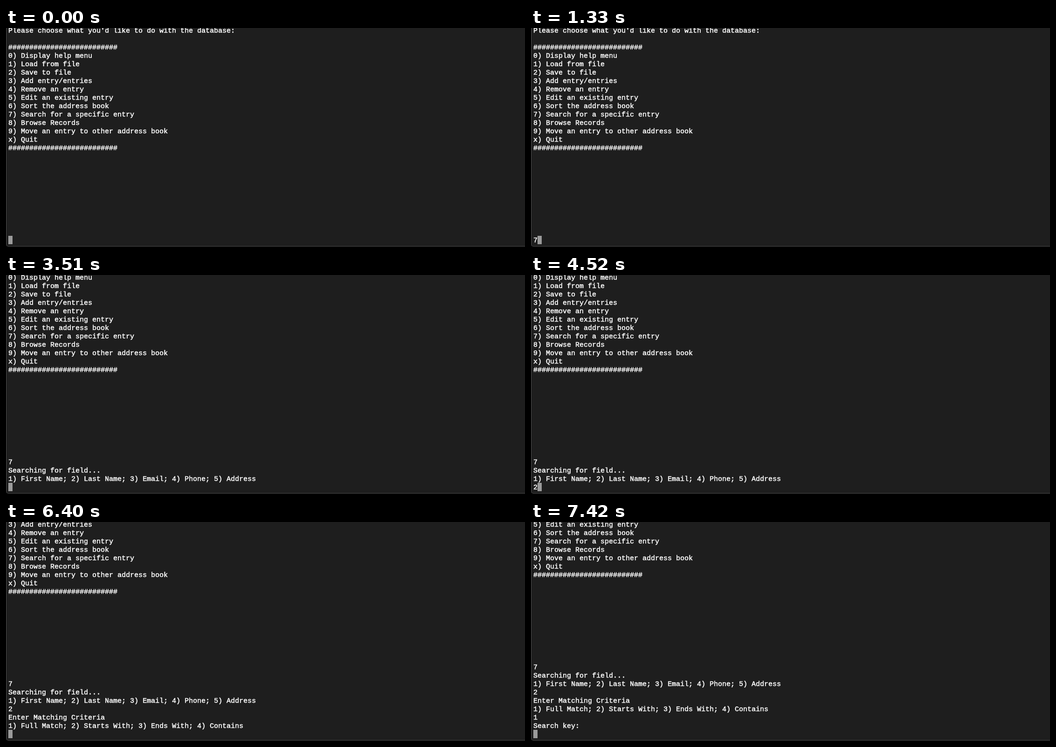
An HTML page that plays this animation: 1113x470 px, repeating every 8 s.

```html
<!DOCTYPE html>
<html lang="en">
<head>
<meta charset="utf-8">
<title>Address book terminal</title>
<style>
  html, body { margin: 0; width: 100%; height: 100%; overflow: hidden; background: #000; }
  #term {
    position: absolute; left: 0; top: -10px; width: 1113px; height: 479px; box-sizing: border-box;
    background: #1e1e1e; border: solid #4b4b4b; border-width: 0 0 1px 1px;
    border-bottom-left-radius: 5px;
  }
  #text {
    position: absolute; left: 5px; bottom: 4px; margin: 0; color: #fff;
    font: 15px/18px "Liberation Mono", "Courier New", monospace;
    -webkit-text-stroke: .5px #fff; font-variant-ligatures: none;
  }
  #cursor { position: absolute; top: 446px; width: 9px; height: 18px; background: #9b9b9b; }
</style>
</head>
<body>
<div id="term"></div>
<pre id="text"></pre>
<div id="cursor"></div>
<script>
const LOOP = 8000;
const rule = "#".repeat(26);
const menu = [
  "Please choose what you'd like to do with the database:",
  "",
  rule,
  "0) Display help menu",
  "1) Load from file",
  "2) Save to file",
  "3) Add entry/entries",
  "4) Remove an entry",
  "5) Edit an existing entry",
  "6) Sort the address book",
  "7) Search for a specific entry",
  "8) Browse Records",
  "9) Move an entry to other address book",
  "x) Quit",
  rule
].join("\n") + "\n".repeat(11);

// Terminal output and keystrokes, each appended at its time in ms
const events = [
  [0, menu],
  [320, "7"],
  [2000, "\nSearching for field...\n1) First Name; 2) Last Name; 3) Email; 4) Phone; 5) Address\n"],
  [4520, "2"],
  [5690, "\nEnter Matching Criteria\n1) Full Match; 2) Starts With; 3) Ends With; 4) Contains\n"],
  [6880, "1"],
  [7420, "\nSearch key:\n"]
];

const text = document.getElementById("text");
const cursor = document.getElementById("cursor");
const start = performance.now();
let shown = "";

function draw() {
  const t = (performance.now() - start) % LOOP;
  const log = events.filter(e => e[0] <= t).map(e => e[1]).join("");
  if (log !== shown) {
    shown = log;
    const rows = log.split("\n").slice(-26);
    // A trailing space keeps an empty prompt row at full height
    text.textContent = rows.join("\n") + " ";
    cursor.style.left = 5 + 9 * rows[rows.length - 1].length + "px";
  }
  requestAnimationFrame(draw);
}
draw();
</script>
</body>
</html>
```
